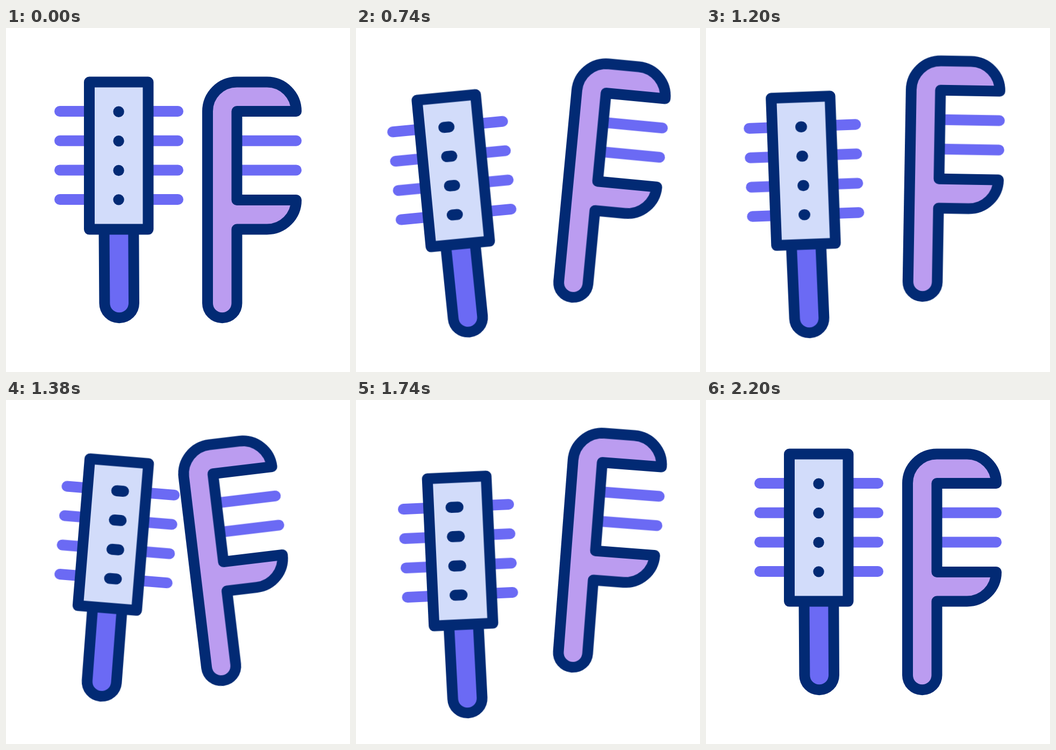
Recreate the animation shown at these times as an HTML page without scripts. Size 640 by 640 pixels, loop 2400 ms.

```html
<!DOCTYPE html>
<html lang="en">
<head>
<meta charset="utf-8">
<title>Brush and comb</title>
<style>
  html, body { margin: 0; width: 100%; height: 100%; overflow: hidden; background: #fff; }
  svg { display: block; width: 100vw; height: 100vh; }

  .ink { stroke: #022a74; }
  .hair { stroke: #6b6af4; }

  .brush, .comb, .left, .right, .dot {
    animation: 2.4s cubic-bezier(.333, 0, .667, 1) infinite;
  }
  .brush { animation-name: brush; transform-origin: 210.5px 512px; }
  .comb { animation-name: comb; transform-origin: 402px 512px; }
  .left { animation-name: left; }
  .right { animation-name: right; }
  .dot { animation-name: dot; }

  @keyframes brush {
    0%, 16.667%, 91.667%, 100% { transform: translate(0, 0) rotate(0deg); }
    41.667% { transform: translate(-4.3px, 44.2px) rotate(-9.1deg); }
    58.333% { transform: translate(-32.7px, 11.8px) rotate(4.75deg); }
    75% { transform: translate(-1.6px, 45px) rotate(-3.1deg); }
  }
  @keyframes comb {
    0%, 16.667%, 91.667%, 100% { transform: translate(0, 0) rotate(0deg); }
    41.667% { transform: translate(3.5px, -63.3px) rotate(9deg); }
    58.333% { transform: translate(-2px, -16.7px) rotate(-6.93deg); }
    75% { transform: translate(1.7px, -43.6px) rotate(5.08deg); }
  }
  /* bristles slide under the plate as the brush tilts */
  @keyframes left {
    0%, 16.667%, 91.667%, 100% { transform: translateX(0); }
    41.667%, 75% { transform: translateX(7.2px); }
    58.333% { transform: translateX(16.7px); }
  }
  @keyframes right {
    0%, 16.667%, 91.667%, 100% { transform: translateX(0); }
    41.667%, 75% { transform: translateX(-16.9px); }
    58.333% { transform: translateX(-2.9px); }
  }
  @keyframes dot {
    0%, 16.667%, 91.667%, 100% { d: path("M0 0h0"); }
    41.667% { d: path("M0 0h-16"); }
    58.333% { d: path("M0 0h12.8"); }
    75% { d: path("M0 0h-14.6"); }
  }
</style>
</head>
<body>
<svg viewBox="0 0 640 640" fill="none" stroke-width="20" stroke-linecap="round" stroke-linejoin="round">
  <g class="brush">
    <path class="hair left" d="M100 155h70M100 209.7h70M100 264.4h70M100 319h70"/>
    <path class="hair right" d="M320 155h-70M320 209.7h-70M320 264.4h-70M320 319h-70"/>
    <path class="ink" fill="#6b6af4" d="M182.5 375L183.4 512A27.3 27.3 0 0 0 238 512L237.3 375"/>
    <path class="ink" fill="#d2dcfa" d="M155 100.5H264.5V374.6H155Z"/>
    <g class="ink" stroke-width="20.4">
      <path class="dot" transform="translate(209.6 155.7)" d="M0 0h0"/>
      <path class="dot" transform="translate(209.6 210.3)" d="M0 0h0"/>
      <path class="dot" transform="translate(209.6 265)" d="M0 0h0"/>
      <path class="dot" transform="translate(209.6 319.4)" d="M0 0h0"/>
    </g>
  </g>
  <g class="comb">
    <path class="hair" d="M430 209.7H540M430 264.4H540"/>
    <path class="ink" fill="#bb9cf0" d="M375 155A54.5 54.5 0 0 1 429.5 100.5H485.5A54.5 54.5 0 0 1 540 155H429.5V320H540A54.5 54.5 0 0 1 485.5 374.5H429.5V512A27.25 27.25 0 0 1 375 512Z"/>
  </g>
</svg>
</body>
</html>
```
